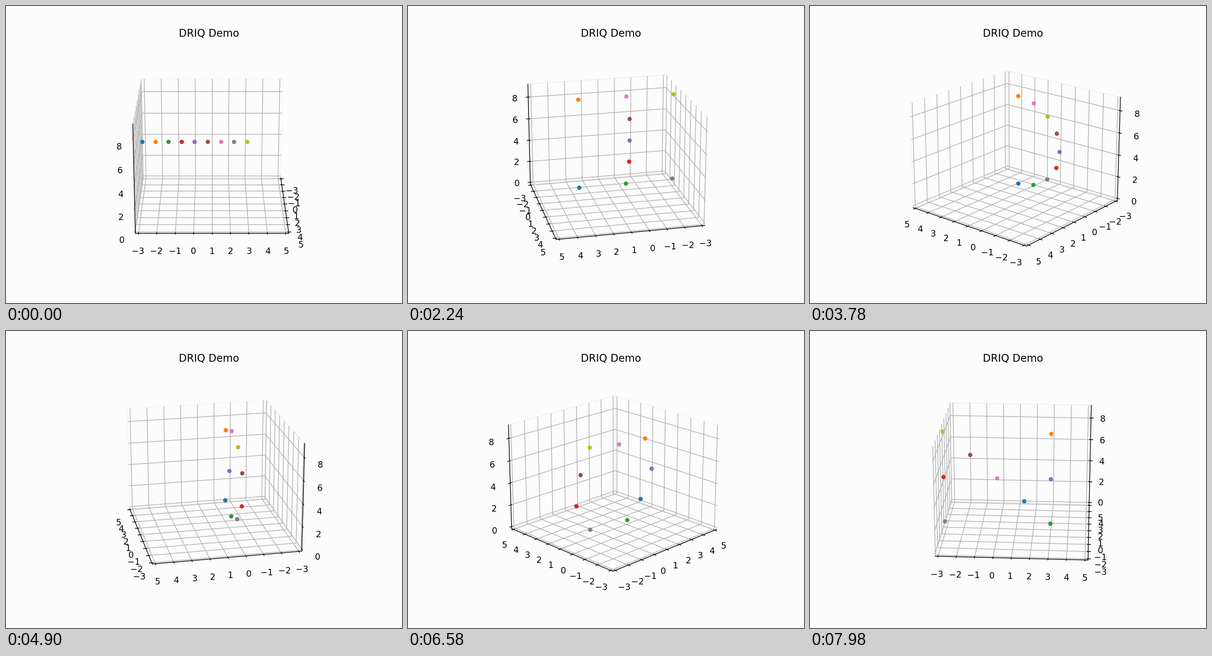
These frames come from a looping animation (864 by 648 pixels, 8000 ms). A matplotlib script:

```python
import numpy as np
import matplotlib.pyplot as plt
from matplotlib.animation import FuncAnimation

LOOP, INTERVAL, STEP = 8000, 40, 140   # ms
MOVE, CYCLE = 9, 15                    # steps in flight, steps per formation
TURN = 4.8                             # degrees of camera turn per step
COUNT = 9
BACK = "#fcfcfc"


def upright(points):
    """Place a flat (x, z) formation in the y = 0 plane, centred in x."""
    x, z = np.array(points, float).T
    return np.column_stack([x - x.mean(), np.zeros(COUNT), z])


def arc(degrees):
    a = np.radians(degrees)
    return upright(np.column_stack([3 * np.cos(a), 5 + 4 * np.sin(a)]))


def match(start, end):
    """Order the end points so that the dots fly the least total distance."""
    cost = np.linalg.norm(start[:, None] - end, axis=2)
    best = {0: (0, ())}                # used end points -> (cost, order)
    for row in cost:
        longer = {}
        for used, (total, order) in best.items():
            for j in range(COUNT):
                if not used >> j & 1:
                    key = used | 1 << j
                    option = (total + row[j], order + (j,))
                    longer[key] = min(longer.get(key, option), option)
        best = longer
    (_, order), = best.values()
    return end[list(order)]


line = np.column_stack([np.zeros(COUNT), np.linspace(-3, 3, COUNT),
                        np.full(COUNT, 5.0)])
bar = upright([(x, z) for x in (3, 0, -3) for z in range(1, 10, 2)
               if x == 0 or z in (1, 9)])
half_ring = arc(np.linspace(90, 270, COUNT))
ring = arc(np.arange(0, 360, 40))
zigzag = upright([(x, z) for x in (-3, 3) for z in (1, 5, 9)]
                 + [(x, 5 - 4 * x / 3) for x in (-1.5, 0, 1.5)])

shapes = [line, bar]
for shape in (half_ring, ring, zigzag):
    shapes.append(match(shapes[-1], shape))


def positions(step):
    leg, k = divmod(step, CYCLE)
    start, end = shapes[leg], shapes[leg + 1]
    return start + (end - start) * min(k / MOVE, 1)


def padded(low, high):
    pad = (high - low) / 48
    return low - pad, high + pad


fig = plt.figure(figsize=(6.4, 4.8), dpi=135, facecolor=BACK)
ax = fig.add_subplot(projection="3d", facecolor=BACK)
ax.set_title("DRIQ Demo")
ax.set(xticks=range(-3, 6), yticks=range(-3, 6), zticks=range(0, 9, 2))
ax.set(xlim=padded(-3, 5), ylim=padded(-3, 5), zlim=padded(0, 9))
for axis in (ax.xaxis, ax.yaxis, ax.zaxis):
    axis.pane.set_fill(False)

dots = [ax.plot([x], [y], [z], "o", ms=4)[0] for x, y, z in line]


def update(i):
    step = (i * INTERVAL + INTERVAL // 2) // STEP
    for dot, (x, y, z) in zip(dots, positions(step)):
        dot.set_data_3d([x], [y], [z])
    ax.view_init(elev=20, azim=TURN * step)
    return dots


ani = FuncAnimation(fig, update, frames=LOOP // INTERVAL, interval=INTERVAL,
                    repeat=True, repeat_delay=0)
plt.show()
```
